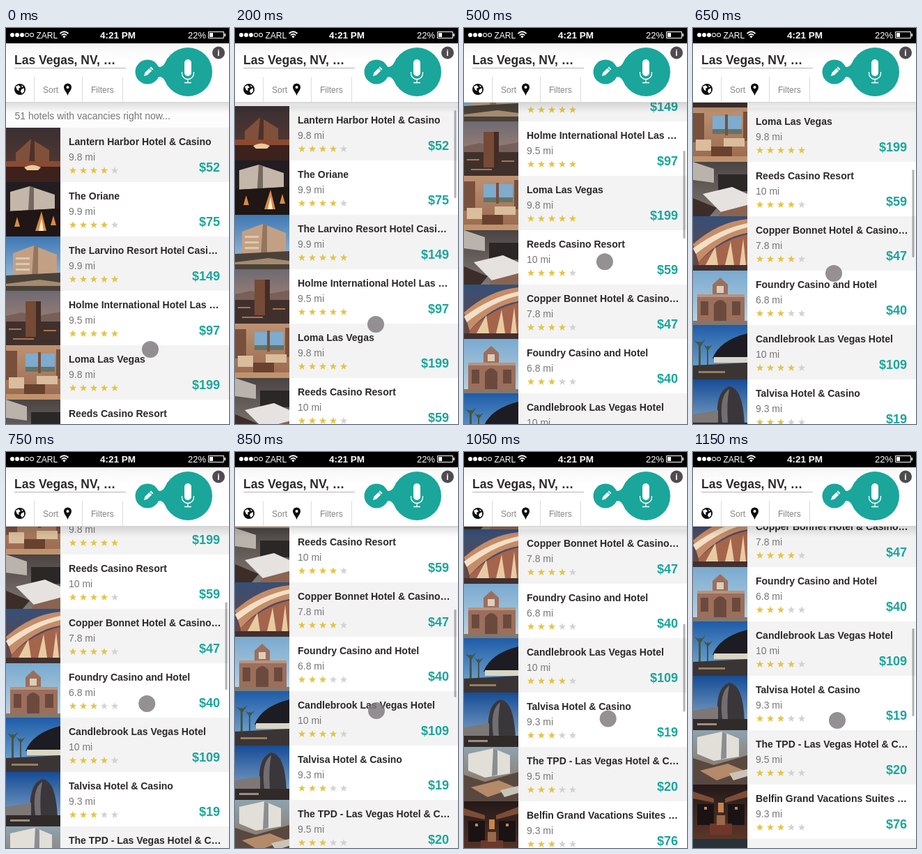
Recreate the animation shown at these times as an HTML page with a canvas. Size 320 by 568 pixels, loop 2150 ms.

```html
<!DOCTYPE html>
<html lang="en">
<head>
<meta charset="utf-8">
<title>Hotel list</title>
<style>
html, body { margin: 0; width: 100%; height: 100%; overflow: hidden; background: #fff; }
canvas { display: block; }
</style>
</head>
<body>
<canvas width="320" height="568"></canvas>
<script>
const g = document.querySelector('canvas').getContext('2d');
const TEAL = '#1aa69b', INK = '#2d2729', GREY = '#777';
const LOOP = 2150, STEP = 50, LAST = 1150, ROW = 78;

// name, miles, stars, price
const hotels = [
  ['Lantern Harbor Hotel & Casino', '9.8', 4, 52],
  ['The Oriane', '9.9', 4, 75],
  ['The Larvino Resort Hotel Casi…', '9.9', 5, 149],
  ['Holme International Hotel Las …', '9.5', 5, 97],
  ['Loma Las Vegas', '9.8', 5, 199],
  ['Reeds Casino Resort', '10', 4, 59],
  ['Copper Bonnet Hotel & Casino…', '7.8', 4, 47],
  ['Foundry Casino and Hotel', '6.8', 3, 40],
  ['Candlebrook Las Vegas Hotel', '10', 4, 109],
  ['Talvisa Hotel & Casino', '9.3', 3, 19],
  ['The TPD - Las Vegas Hotel & C…', '9.5', 3, 20],
  ['Belfin Grand Vacations Suites …', '9.3', 3, 76],
  ['', '', 0, 0]
];

// top colour, bottom colour, then pairs of colour and path
const photos = [
  ['#3a2f33', '#5c3a30', '#80503a', 'M14 36L36 16L62 32V50H14z', '#4d3029', 'M36 16L41 19V50H33z',
    '#8a4a32', 'M0 48H78V56H0z', '#3c211c', 'M0 56H78V78H0z', '#eccb9a', 'M26 57Q38 50 50 57L46 61H30z'],
  ['#211d22', '#2b1d1a', '#c4b6a8', 'M6 14L34 6L70 18V38L6 42z', '#75685f', 'M34 6L40 8V40H32z',
    '#1f1615', 'M0 42L78 38V78H0z', '#d98a48', 'M12 64L16 50L20 64zM42 70L51 42L58 70zM64 62L68 48L72 62z',
    '#fff0c4', 'M47 70L51 52L54 70z'],
  ['#3f78b4', '#a9c8dc', '#c3a084', 'M10 24L40 13L73 26V58H10z', '#94755f', 'M40 13L46 15V58H37z',
    '#dcc8b0', 'M14 30H34V33H14zM14 38H34V41H14zM14 46H34V49H14z', '#4a4239', 'M0 56L78 52V78H0z', '#a58a70', 'M0 68L48 62L78 66V71H0z'],
  ['#6f6a72', '#b78e76', '#786059', 'M0 36L22 31L50 35L78 30V46H0z', '#40302c', 'M0 44H78V78H0z',
    '#754a36', 'M28 15H50V66H28z', '#432c25', 'M43 15H50V66H43z', '#a9754f', 'M4 54H22V56H4zM54 56H72V58H54zM10 68H40V70H10z'],
  ['#bd9272', '#98684e', '#7eabce', 'M28 12H70V38H28z', '#657367', 'M28 31H70V38H28z', '#78503c', 'M0 8H16V50H0zM46 10H50V40H46zM72 6H78V48H72z',
    '#d9bd9c', 'M4 46H26V62H4zM44 44H74V56H44z', '#68412f', 'M26 56H56V70H26z', '#c0936c', 'M0 70H78V78H0z'],
  ['#4a4443', '#817771', '#b9b3ac', 'M0 0L30 10V30L0 26z', '#2b2727', 'M36 18H78V42H36z',
    '#e6e2df', 'M14 46L56 36L78 46V62L40 72z', '#3c2d28', 'M0 52L34 66L24 78H0z', '#8a6450', 'M40 72L78 62V78H36z'],
  ['#354f78', '#6b453e', '#c58c68', 'M0 40Q36 8 78 4V24Q40 30 8 66z', '#f3dfc6', 'M0 46Q38 18 78 10V16Q42 24 4 54z',
    '#a5644c', 'M8 66Q40 34 78 26V78H8z', '#e8cba2', 'M18 70L32 44L36 70zM46 70L54 36L59 70zM67 70L72 32L76 70z', '#42302f', 'M0 70H78V78H0z'],
  ['#79aad0', '#bcd2de', '#9b6f5c', 'M6 34H28V20L39 10L50 20V34H74V72H6z', '#6b4a3d', 'M30 72V48Q39 36 48 48V72zM11 44H22V64H11zM56 44H68V64H56z',
    '#dccdb9', 'M34 22H44V32H34z', '#b8937e', 'M6 34H74V38H6z', '#83776f', 'M0 72H78V78H0z'],
  ['#1f5ca8', '#7fb2d8', '#1d1c22', 'M78 12Q38 22 28 48H78z', '#d9d6c6', 'M30 46H78V54H30z', '#465540', 'M8 24H11V64H8zM20 30H22V64H20zM2 22L10 26L18 20L10 32zM15 28L21 32L28 28L21 37z',
    '#3b3434', 'M0 58L78 54V78H0z', '#94805f', 'M8 66H46V69H8z'],
  ['#164c96', '#8fb0cc', '#3a373b', 'M36 66Q30 18 52 10Q72 12 74 66z', '#716d70', 'M42 62Q37 24 52 14Q48 34 50 62z',
    '#7d7775', 'M0 50L36 44V66H0z', '#302a29', 'M0 62H78V78H0z', '#9c8e80', 'M6 68H34V71H6z'],
  ['#8ea3ae', '#8a6b54', '#e2dfd8', 'M6 10L42 2L66 12V38L30 44L6 34z', '#8a8e92', 'M42 2L48 5V40L40 42z',
    '#59483f', 'M0 40L30 50L78 36V78H0z', '#b48a68', 'M10 58L50 48L74 58L34 72z', '#cac3b8', 'M52 62L78 56V66L58 72z'],
  ['#24191a', '#5b3626', '#7d4d36', 'M0 10L30 20V26L0 20zM78 8L46 20V26L78 18z', '#1a1314', 'M6 28H30V58H6zM50 28H74V58H50z',
    '#c6844e', 'M36 26H44V40H36zM16 32H20V36H16zM60 32H64V36H60z', '#6f372b', 'M24 56H56V72H24z', '#98694a', 'M34 44H46V58H34z'],
  ['#26323a', '#41352e']
].map(([top, bottom, ...shapes]) => [fade(top, bottom, 0, ROW), 'M0 0H78V78H0z', ...shapes]);

// time, scroll offset, touch x, touch y
const keys = [
  [0, 0, 207, 461], [200, 31, 202, 425], [400, 172, 202, 338], [650, 341, 202, 352],
  [850, 424, 203, 371], [950, 472, 206, 379], [1150, 524, 207, 385]
];

// Cubic Hermite through the keys
function at(t, col) {
  let i = 0;
  while (i < keys.length - 2 && t >= keys[i + 1][0]) i++;
  const slope = k => {
    const a = keys[Math.max(k - 1, 0)], b = keys[Math.min(k + 1, keys.length - 1)];
    return (b[col] - a[col]) / (b[0] - a[0]);
  };
  const a = keys[i], b = keys[i + 1], d = b[0] - a[0], u = (t - a[0]) / d, v = 1 - u;
  return a[col] * v * v * (1 + 2 * u) + b[col] * u * u * (3 - 2 * u) +
    d * u * v * (v * slope(i) - u * slope(i + 1));
}

function fade(from, to, y0, y1) {
  const f = g.createLinearGradient(0, y0, 0, y1);
  f.addColorStop(0, from);
  f.addColorStop(1, to);
  return f;
}
function rect(color, x, y, w, h) {
  g.fillStyle = color;
  g.fillRect(x, y, w, h);
}
function shape(color, d) {
  g.fillStyle = color;
  g.fill(new Path2D(d));
}
function line(color, width, d) {
  g.strokeStyle = color;
  g.lineWidth = width;
  g.stroke(new Path2D(d));
}
function disc(color, x, y, r) {
  g.fillStyle = color;
  g.beginPath();
  g.arc(x, y, r, 0, 7);
  g.fill();
}
function pill(color, x, y, w, h, r) {
  g.fillStyle = color;
  g.beginPath();
  g.roundRect(x, y, w, h, r);
  g.fill();
}
function text(s, x, y, size, color, bold = false, align = 'left') {
  g.font = `${bold ? 'bold ' : ''}${size}px "Liberation Sans", Arial, sans-serif`;
  g.fillStyle = color;
  g.textAlign = align;
  g.fillText(s, x, y);
}
function star(color, x, y) {
  g.fillStyle = color;
  g.beginPath();
  for (let i = 0; i < 10; i++) {
    const r = i % 2 ? 2.3 : 5.5, a = i * Math.PI / 5;
    g.lineTo(x + r * Math.sin(a), y - r * Math.cos(a));
  }
  g.fill();
}

function row(i, y) {
  const [name, miles, stars, price] = hotels[i];
  g.save();
  g.translate(0, y);
  rect(i % 2 ? '#fff' : '#f3f3f3', 0, 0, 320, ROW);
  const art = photos[i];
  for (let k = 0; k < art.length; k += 2) shape(art[k], art[k + 1]);
  if (name) {
    text(name, 90, 25, 14, INK, true);
    text(miles + ' mi', 90, 47, 14, GREY);
    for (let k = 0; k < 5; k++) star(k < stars ? '#e4c445' : '#d2d2d2', 96 + 15 * k, 61.5);
    text('$' + price, 307, 63, 18, TEAL, true, 'right');
  }
  g.restore();
}

function statusBar() {
  rect('#000', 0, 0, 320, 22);
  for (let i = 0; i < 5; i++) {
    disc('#fff', 9 + 7 * i, 10, 3);
    if (i > 2) disc('#000', 9 + 7 * i, 10, 2.1);
  }
  text('ZARL', 43.5, 14.5, 12, '#fff');
  line('#fff', 1.7, 'M77.5 8Q83.5 2.5 89.5 8M79.8 10.5Q83.5 7 87.2 10.5');
  shape('#fff', 'M81.3 12.2Q83.5 10 85.7 12.2L83.5 14.6z');
  text('4:21 PM', 160.5, 15, 13.5, '#fff', true, 'center');
  text('22%', 287, 14.5, 13, '#fff', false, 'right');
  line('#fff', 1, 'M290.5 5.5H312.5V14.5H290.5z');
  rect('#fff', 292, 7, 5, 6);
  rect('#fff', 313.5, 8, 1.5, 4);
}

function header() {
  rect(fade('rgba(0,0,0,.13)', 'rgba(0,0,0,0)', 106, 122), 0, 106, 320, 16);
  rect(fade('#f6f6f6', '#fff', 22, 46), 0, 22, 320, 84);
  rect('#d4d4d4', 0, 106, 320, 1);
  text('Las Vegas, NV, …', 12, 52, 17.5, INK, true);
  rect('#b4b4b4', 12, 57, 160, 1);
  for (const x of [40, 109, 167]) rect('#dcdcdc', x, 70, 1, 36);

  disc('#0c0c0c', 20, 88, 8);
  shape('#fff', 'M14 84L18 82L21 85L18 87L19 90L16 89zM22 88L26 86L26 91L23 94L21 91zM22 82L25 84L23 85z');
  text('Sort', 53, 93, 12, '#858585');
  shape('#0c0c0c', 'M88.5 97C87 92 83 89 83 85A5.5 5.5 0 0 1 94 85C94 89 90 92 88.5 97z');
  disc('#fff', 88.5, 85, 2);
  text('Filters', 122, 93, 12, '#858585');

  disc(TEAL, 261, 63, 35);
  disc(TEAL, 203, 63, 17.5);
  shape(TEAL, 'M212 48Q222 66 232 43V83Q222 60 212 78z');
  pill('#fff', 256, 45, 10, 24, 5);
  line('#fff', 1.3, 'M252.5 63V65A8.5 8.5 0 0 0 269.5 65V63M261 73.5V78M256 78.5H266');
  g.save();
  g.translate(204, 63);
  g.rotate(Math.PI / 4);
  shape('#fff', 'M-2.5 -8H2.5V-6H-2.5zM-2.5 -5H2.5V4L0 8.5L-2.5 4z');
  g.restore();
  disc('#4f4b50', 305, 35.5, 9);
  text('i', 305, 40, 12, '#fff', true, 'center');
}

function draw(now) {
  const t = Math.min(Math.floor(now % LOOP / STEP) * STEP, LAST);
  const scroll = Math.round(at(t, 1)), top = 143 - scroll;
  rect('#fff', 0, 0, 320, 568);
  rect('#fcfcfc', 0, top - 37, 320, 37);
  text('51 hotels with vacancies right now...', 12.5, top - 12, 14, GREY);
  hotels.forEach((_, i) => {
    const y = top + ROW * i;
    if (y > 22 - ROW && y < 568) row(i, y);
  });
  const alpha = 0.3 * Math.min(1, t / 150);
  pill(`rgba(0,0,0,${alpha})`, 314.5, 109.5 + scroll * 0.274, 3, 126, 1.5);
  header();
  statusBar();
  disc('rgba(126,120,123,.82)', at(t, 2), at(t, 3), 12);
}

const start = performance.now();
function tick() {
  draw(performance.now() - start);
  requestAnimationFrame(tick);
}
tick();
</script>
</body>
</html>
```
